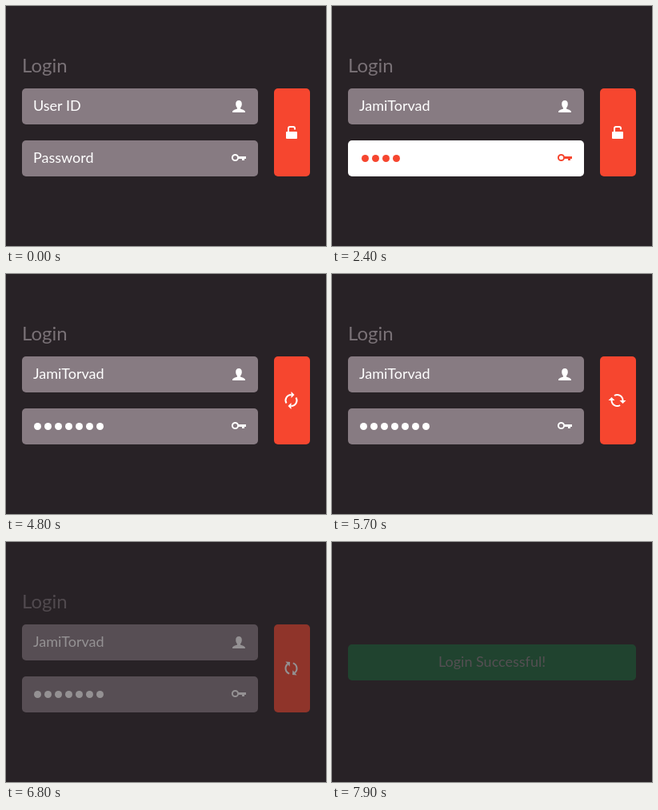
These frames come from a looping animation (400x300 px, 8 s). An HTML page:

```html
<!DOCTYPE html>
<html lang="en">
<head>
<meta charset="utf-8">
<title>Login</title>
<style>
html, body { margin: 0; height: 100%; overflow: hidden; background: #282226; }
svg { display: block; width: 400px; height: 300px; }
text { font: 18px Lato, "Open Sans", sans-serif; }
.field { fill: #fff; color: #877b82; }
.field.focus { fill: #f6462f; color: #fff; }
.field rect { fill: currentColor; }
.line { fill: none; stroke-width: 2; }
.field .line { stroke: #fff; }
.field.focus .line { stroke: #f6462f; }
</style>
</head>
<body>
<svg viewBox="0 0 400 300">
  <g id="form">
    <text x="20" y="83" fill="#797176" style="font-size:24px">Login</text>
    <g id="user" class="field">
      <rect x="20" y="103" width="295" height="45" rx="5"/>
      <text id="name" y="131"></text>
      <path d="M291 118c-2.6 0-3.8 1.8-3.8 4.4 0 2 .7 3.8 1.8 4.9v1.3c-2.500 1-6 1.300-6 4.400h16c0-3.100-3.500-3.400-6-4.400v-1.300c1.100-1.100 1.800-2.900 1.800-4.900 0-2.600-1.200-4.400-3.800-4.400z"/>
    </g>
    <g id="pass" class="field">
      <rect x="20" y="168" width="295" height="45" rx="5"/>
      <text id="hint" x="34" y="196">Password</text>
      <g id="dots"></g>
      <circle class="line" cx="286.500" cy="189.500" r="3.600"/>
      <path d="M290.500 188H300v3h-2v2h-3v-2h-4.500z"/>
    </g>
    <rect id="button" x="335" y="103" width="45" height="110" rx="5"/>
    <g id="lock" fill="#fff">
      <rect x="350" y="157" width="14" height="9" rx="1"/>
      <path class="line" stroke="#fff" d="M353 157v-4q0-2 2-2h4q2 0 2 2v1.500"/>
    </g>
    <g id="spinner" fill="#fff">
      <g id="arrow">
        <path class="line" stroke="#fff" d="M0-7A7 7 0 0 0-6 3.600"/>
        <path d="M0-11l4 4-4 4z"/>
      </g>
      <use href="#arrow" transform="rotate(180)"/>
    </g>
  </g>
  <g id="success">
    <rect x="20" y="128" width="360" height="45" rx="5" fill="#05c753"/>
    <text x="200" y="156" text-anchor="middle" fill="#fff">Login Successful!</text>
  </g>
</svg>
<script>
const $ = id => document.getElementById(id);
const userName = "JamiTorvad";
const clamp = (v, lo, hi) => Math.min(hi, Math.max(lo, v));
const show = (id, on) => $(id).style.display = on ? "" : "none";

$("dots").innerHTML = Array.from({ length: 7 }, (_, i) =>
  `<circle cx="${39.5 + 13 * i}" cy="190.5" r="4.500"/>`).join("");

// One step is 100 ms; the loop has 80 steps.
function draw(step) {
  const onUser = step >= 5 && step < 20;
  const onPass = step >= 20 && step < 28;
  $("user").classList.toggle("focus", onUser);
  $("pass").classList.toggle("focus", onPass);

  $("name").textContent = step < 5 ? "User ID" : userName.slice(0, step - 5);
  $("name").setAttribute("x", onUser ? 36 : 34);

  show("hint", step < 20);
  [...$("dots").children].forEach((dot, i) => dot.style.display = step > 20 + i ? "" : "none");
  $("dots").setAttribute("transform", `translate(${onPass ? 2 : 0})`);

  const pressed = step >= 33 && step < 35;
  $("button").setAttribute("fill", pressed ? "#d93824" : "#f6462f");
  show("lock", step < 35);
  show("spinner", step >= 35);
  const angle = (Math.min(step, 62) - 48) * 10;
  $("spinner").setAttribute("transform", `translate(356.5 158) rotate(${angle})`);

  $("form").setAttribute("opacity", step >= 73 ? 0 : clamp(0.5 + (68 - step) * 0.0975, 0, 1));
  $("success").setAttribute("opacity", clamp((step - 77) / 10, 0, 1));
}

const start = performance.now();
function tick() {
  draw(Math.floor((performance.now() - start) % 8000 / 100));
  requestAnimationFrame(tick);
}
tick();
</script>
</body>
</html>
```
